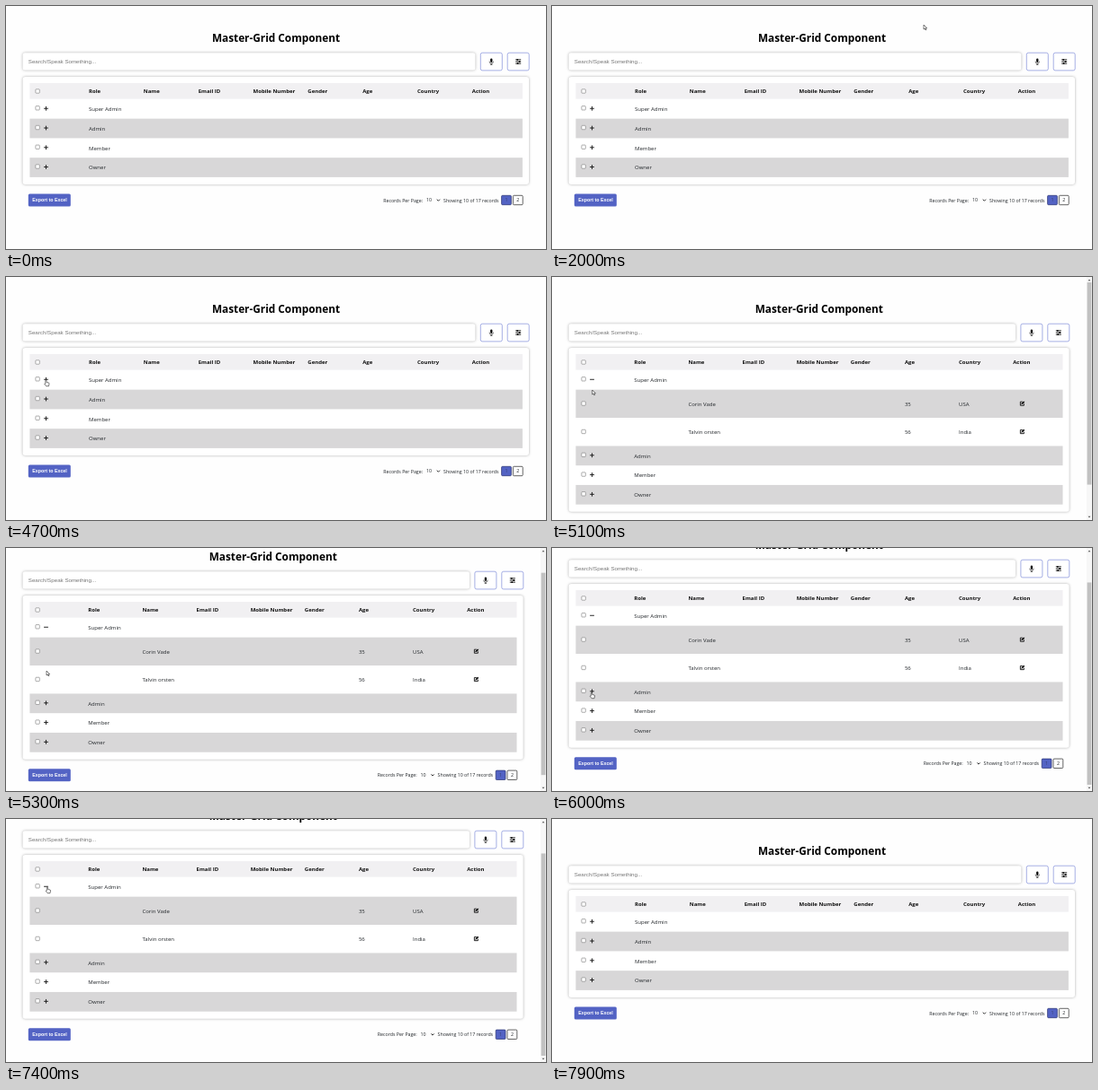
An HTML page that plays this animation: 600 px wide and 271 px high, repeating every 8 s.

```html
<!DOCTYPE html>
<html lang="en">
<head>
<meta charset="utf-8">
<title>Master-Grid Component</title>
<style>
  html, body { margin: 0; width: 100%; height: 100%; overflow: hidden; background: #fefefe; }
  svg { display: block; width: 100vw; height: 100vh; }
  text { font-family: "Open Sans", "Noto Sans", sans-serif; font-size: 6px; fill: #212529; white-space: pre; }
  .title { font-size: 11.8px; font-weight: 700; fill: #000; text-anchor: middle; }
  .head { font-weight: 700; fill: #111; }
  .hint { font: 6.2px "Liberation Sans", Arial, sans-serif; fill: #757575; }
  .export { font: 700 5.3px "Liberation Sans", Arial, sans-serif; fill: #fff; }
  .foot { font-size: 5.25px; }
  .page { font-size: 5.25px; text-anchor: middle; }
  .panel { fill: #fff; filter: drop-shadow(0 .6px 1.5px rgba(0, 0, 0, .32)); }
  .tool { fill: #fff; stroke: #8f9ade; stroke-width: .8; }
  .check { fill: #fff; stroke: #767676; stroke-width: .6; }
  .line { fill: none; stroke: #111; stroke-width: .9; }
  .pointer { fill: #fff; stroke: #222; stroke-width: .6; stroke-linejoin: round; }
</style>
</head>
<body>
<svg id="stage" viewBox="0 0 600 271" preserveAspectRatio="none"></svg>
<script>
const stage = document.getElementById("stage");
const LOOP = 8000, STEP = 100, VIEW = 271;
const GROUP_H = 21.75, RECORD_H = 31.4, ROWS_TOP = 103.9;
const BLUE = "#5363c4";

const headings = ["Role", "Name", "Email ID", "Mobile Number", "Gender", "Age", "Country", "Action"];
const groups = [
  { role: "Super Admin", open: [4800, 7600],
    records: [["Corin Vade", 35, "USA"], ["Talvin orsten", 56, "India"]] },
  { role: "Admin", open: [6200, 7200],
    records: [["Orla Fenrow", 28, "India"], ["Daven Quill", 41, "USA"], ["Mira Toskel", 33, "India"]] },
  { role: "Member" },
  { role: "Owner" }
];

// [time, scroll offset]
const scrollKeys = [[5100, 0], [5400, 39], [6700, 39], [6900, 65], [7100, 65], [7200, 39], [7500, 39], [7600, 0]];
// [time, x, y, hand]
const pointerKeys = [
  [2000, 413, 21], [2300, 260, 66], [2600, 40, 104], [2900, 3, 108], [3200, 55, 90], [3500, 96, 118],
  [3700, 84, 112], [4100, 60, 106], [4500, 44.5, 115, 1], [4900, 44.5, 115], [5300, 45, 137],
  [5600, 45, 150], [5800, 44, 161, 1], [6400, 44, 161], [6600, 146, 58], [6900, 146, 58],
  [7100, 44.5, 134, 1], [7200, 44.5, 134], [7400, 46, 76, 1], [7600, 46, 76], [7800, 80, 12], [7900, 90, 0]
];

function sample(keys, t) {
  if (t <= keys[0][0]) return keys[0].slice(1);
  const next = keys.findIndex(k => k[0] > t);
  if (next < 0) return keys.at(-1).slice(1);
  const a = keys[next - 1], b = keys[next];
  const p = (t - a[0]) / (b[0] - a[0]);
  return [1, 2].map(i => a[i] + (b[i] - a[i]) * p).concat(a[3]);
}

const rect = (x, y, w, h, attrs = "") => `<rect x="${x}" y="${y}" width="${w}" height="${h}" ${attrs}/>`;
const path = (d, attrs = 'class="line"') => `<path d="${d}" ${attrs}/>`;
const text = (x, y, str, cls = "") => `<text x="${x}" y="${y}" class="${cls}">${str}</text>`;
const at = (x, y, inner) => `<g transform="translate(${x} ${y})">${inner}</g>`;
const checkbox = y => rect(32.9, y - 2.2, 4.4, 4.4, 'rx=".7" class="check"');

const micIcon = rect(-1.1, -3.5, 2.2, 4.4, 'rx="1.1"') +
  path("M-2.1-.4V.1A2.1 2.1 0 0 0 2.1 .1V-.4M0 2.2V3.5M-1.2 3.4H1.2", 'class="line" style="stroke-width:.6"');
const filterIcon = path("M-3-2.2H3M-3 0H3M-3 2.2H3") +
  [[-1, -2.2], [1.4, 0], [-.6, 2.2]].map(([x, y]) => `<circle cx="${x}" cy="${y}" r=".9"/>`).join("");
const editIcon = path("M.2-1.8H-2.2V2.3H1.8V.4M-.8 .8L2.1-2.1") +
  path("M-1.1 1.1L-.8-.3L1.4-2.5L2.6-1.3L.4 .8Z", 'fill="#111"');
const arrow = path("M0 0V5L1.2 4L2 5.8L2.9 5.4L2.1 3.7H3.6Z", 'class="pointer"');
const hand = path("M-.7 3.6V.6Q0-.3 .6 .6V2.5L3 3Q3.6 3.2 3.5 4L3 6.7H.1L-1.7 4.4Q-1.6 3.5-.7 4.1Z", 'class="pointer"');

function tableRows(t, width, columnX) {
  let y = ROWS_TOP, count = 0, out = "";
  const band = h => {
    if (count++ % 2) out += rect(26.4, y, width, h, 'fill="#d8d7d8"');
    y += h;
    return y - h / 2;
  };
  for (const { role, open, records } of groups) {
    const isOpen = open && t >= open[0] && t < open[1];
    const mid = band(GROUP_H);
    out += checkbox(mid - 1) + path(`M42.1 ${mid - .5}h4.8${isOpen ? "" : "m-2.4-2.4v4.8"}`) +
      text(columnX(1), mid + 2.3, role);
    if (!isOpen) continue;
    for (const [name, age, country] of records) {
      const c = band(RECORD_H);
      out += checkbox(c - .3) + text(columnX(2), c + 2.3, name) + text(columnX(6), c + 2.3, age) +
        text(columnX(7), c + 2.3, country) + at(columnX(8) + 10.4, c - .4, editIcon);
    }
  }
  return { out, end: y };
}

function footer(y, right) {
  const mid = y + 7, x = right - 574.5;
  return rect(24.8, y, 47, 14, `rx="1.5" fill="${BLUE}"`) + text(29.2, mid + 1.5, "Export to Excel", "export") +
    text(419.2 + x, mid + 2.2, "Records Per Page:", "foot") + text(467 + x, mid + 2, "10", "foot") +
    path(`M${478.8 + x} ${mid - .7}l1.6 1.6l1.6-1.6`) +
    text(486 + x, mid + 2.2, "Showing 10 of 17 records", "foot") +
    rect(550.6 + x, mid - 5.1, 10.8, 10.4, `rx="1" fill="${BLUE}" stroke="#26306f" stroke-width=".7"`) +
    `<g opacity=".55">${text(556 + x, mid + 2, "1", "page")}</g>` +
    rect(563.4 + x, mid - 5.1, 10.8, 10.4, 'rx="1" fill="#fff" stroke="#222" stroke-width=".7"') +
    text(568.8 + x, mid + 2, "2", "page");
}

function scrollbar(scroll, pageHeight) {
  const track = 258, scale = track / pageHeight;
  return rect(594, 0, 6, VIEW, 'fill="#f7f7f7"') +
    rect(594.6, 6 + scroll * scale, 4.8, VIEW * scale, 'fill="#c1c1c1"') +
    path("M595.6 4.2L597 2.4L598.4 4.2ZM595.6 266.8L597 268.6L598.4 266.8Z", 'fill="#555"');
}

function render(t) {
  const expanded = t >= groups[0].open[0] && t < groups[0].open[1];
  const inset = expanded ? 6.4 : 0;
  const width = 547.5 - inset, right = 574.5 - inset;
  const columnX = i => 26.4 + i * width / 9 + 4.8;
  const [scroll] = sample(scrollKeys, t);
  const rows = tableRows(t, width, columnX);

  const page = text(300 - inset / 2, 40.4, "Master-Grid Component", "title") +
    rect(18.6, 52.2, 502.8 - inset, 19.4, 'rx="2.5" class="panel"') +
    text(24.8, 63.7, "Search/Speak Something...", "hint") +
    [[527.3, micIcon], [557.2, filterIcon]].map(([x, icon]) =>
      rect(x - inset, 52.2, 24, 19.7, 'rx="2" class="tool"') + at(x + 12 - inset, 62, icon)).join("") +
    rect(18.6, 79, 562.4 - inset, rows.end + 8 - 79, 'rx="3" class="panel"') +
    rect(26.4, 86, width, 17.6, 'fill="#f1f0f2"') + checkbox(95) +
    headings.map((h, i) => text(columnX(i + 1), 97.4, h, "head")).join("") +
    rows.out + footer(rows.end + 18.5, right);

  let out = at(0, -scroll, page);
  if (expanded) out += scrollbar(scroll, rows.end + 56.3);
  if (t >= 2000 && t < 7900) {
    const [x, y, isHand] = sample(pointerKeys, t);
    out += at(x, y, isHand ? hand : arrow);
  }
  stage.innerHTML = out;
}

const start = performance.now();
let shown = -1;
function tick() {
  const t = Math.floor(((performance.now() - start) % LOOP) / STEP) * STEP;
  if (t !== shown) render(shown = t);
  requestAnimationFrame(tick);
}
tick();
</script>
</body>
</html>
```
